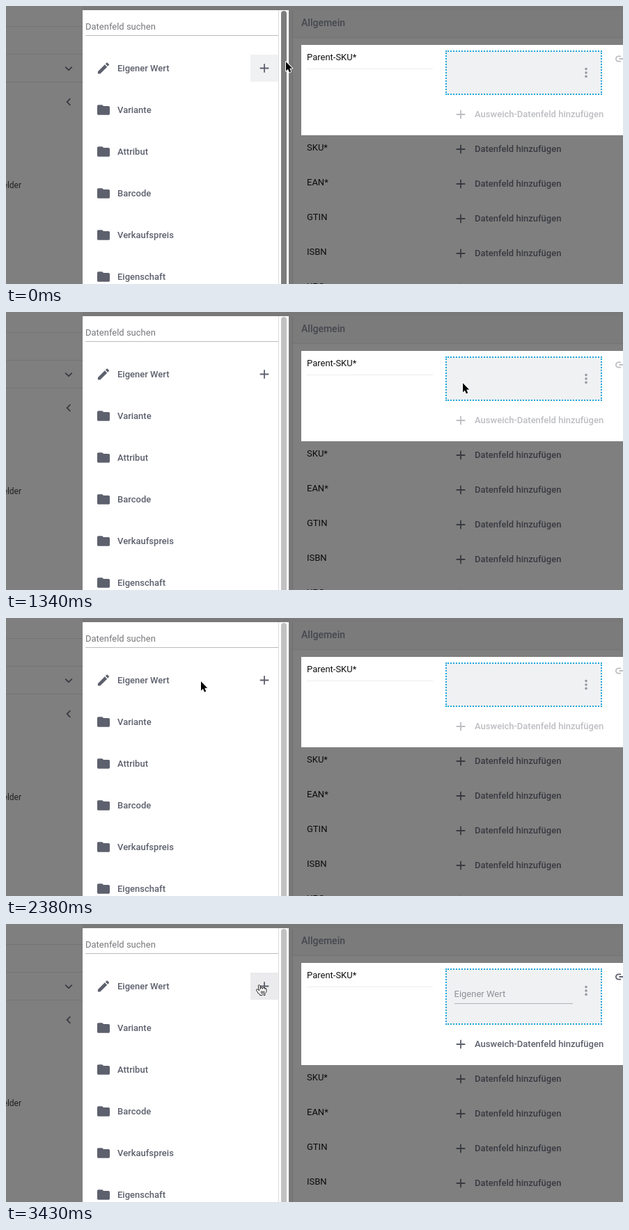
Write an HTML page that moves like this. It is 886 px wide and 400 px high and loops after 8 s.

```html
<!DOCTYPE html>
<html lang="de">
<head>
<meta charset="utf-8">
<title>Datenfelder</title>
<style>
  html, body { margin: 0; width: 100%; height: 100%; overflow: hidden; background: #7f7f7f; }
  svg { display: block; width: 100%; height: 100%; }
  text { font: 400 13px Roboto, sans-serif; }
  .medium { font-weight: 500; }
  .drop { box-sizing: border-box; width: 225px; border: 2px dotted #1ea7d9; background: #f0f1f3; }
</style>
</head>
<body>
<svg id="stage" viewBox="0 0 886 400"></svg>
<script>
const LOOP = 8000;
const INK = '#5d606d', DIM_INK = '#393a41', PALE = '#bdbec2';
const SHIFT = 17; // growth of the field once a value is added

const ICONS = {
  edit: 'M3 17.25V21h3.75L17.81 9.94l-3.75-3.75zM20.71 7.04a1 1 0 0 0 0-1.41l-2.34-2.34a1 1 0 0 0-1.41 0l-1.83 1.83 3.75 3.75z',
  folder: 'M10 4H4c-1.1 0-2 .9-2 2v12c0 1.1.9 2 2 2h16c1.1 0 2-.9 2-2V8c0-1.1-.9-2-2-2h-8z',
  add: 'M19 13h-6v6h-2v-6H5v-2h6V5h2v6h6z',
  down: 'M16.6 8.6 12 13.2 7.4 8.6 6 10l6 6 6-6z',
  left: 'M15.4 7.4 14 6l-6 6 6 6 1.4-1.4L10.8 12z',
  more: 'M10 6a2 2 0 1 0 4 0a2 2 0 1 0-4 0M10 12a2 2 0 1 0 4 0a2 2 0 1 0-4 0M10 18a2 2 0 1 0 4 0a2 2 0 1 0-4 0',
  link: 'M3.9 12c0-1.7 1.4-3.1 3.1-3.1h4V7H7a5 5 0 0 0 0 10h4v-1.9H7c-1.7 0-3.1-1.4-3.1-3.1zM8 13h8v-2H8z'
};

const rect = (x, y, w, h, fill, extra = '') =>
  `<rect x="${x}" y="${y}" width="${w}" height="${h}" fill="${fill}" ${extra}/>`;
const text = (x, y, label, fill, extra = '') =>
  `<text x="${x}" y="${y}" fill="${fill}" ${extra}>${label}</text>`;
const icon = (name, cx, cy, fill, extra = '') =>
  `<path d="${ICONS[name]}" fill="${fill}" transform="translate(${cx} ${cy}) scale(.9) translate(-12 -12)" ${extra}/>`;
const MEDIUM = 'class="medium"';

const sideBackground =
  [29, 69, 109].map(y => rect(0, y, 110, 1, '#747474')).join('') +
  icon('down', 90, 90, DIM_INK) +
  icon('left', 90, 138, DIM_INK) +
  text(22, 262, 'elder', '#202124', 'text-anchor="end" style="font-size:12px"');

const pageBackground =
  rect(110, 0, 776, 6, '#797979') +
  rect(406, 0, 6, 400, '#797979') +
  rect(411, 6, 1, 394, '#6f6f6f') +
  rect(412, 6, 474, 39, '#7b7b7b') +
  rect(412, 45, 474, 1, '#747474') +
  text(424, 29, 'Allgemein', '#45474e', MEDIUM + ' style="font-size:14px"');

const fieldRows = ['SKU*', 'EAN*', 'GTIN', 'ISBN', 'UPC'].map((label, i) => {
  const y = 206 + 50 * i;
  return text(432, y + 2, label, '#0c0c0c') +
    icon('add', 653, y, DIM_INK) +
    text(673, y + 4, 'Datenfeld hinzufügen', DIM_INK, MEDIUM);
}).join('');

const activeField =
  rect(424, 56, 462, 130, '#fff', 'id="card"') +
  text(432, 78, 'Parent-SKU*', '#111') +
  rect(432, 90, 181, 1, '#ededed') +
  `<foreignObject x="631" y="64" width="225" height="90">
     <div xmlns="http://www.w3.org/1999/xhtml" class="drop" id="drop"></div>
   </foreignObject>` +
  icon('more', 833, 96, '#97989f') +
  `<g id="value">${text(643.5, 105, 'Eigener Wert', '#8f9097')}${rect(644, 114, 170, 1, '#b2b3b6')}</g>` +
  icon('link', 884, 76, PALE, 'id="link"') +
  `<g id="fallback">${icon('add', 653, 156, 'currentColor')}
    ${text(673, 160, 'Ausweich-Datenfeld hinzufügen', 'currentColor', MEDIUM)}</g>`;

const menuItems = ['Eigener Wert', 'Variante', 'Attribut', 'Barcode', 'Verkaufspreis', 'Eigenschaft']
  .map((label, i) => {
    const y = 89.5 + 60 * i;
    return icon(i ? 'folder' : 'edit', 140, y, INK) + text(160, y + 4.5, label, INK, MEDIUM);
  }).join('');

const menu =
  rect(110, 6, 296, 394, '#fff') +
  text(114, 34, 'Datenfeld suchen', '#77787c') +
  rect(114, 42, 277, 1, '#bcbcbc') +
  rect(351, 70, 40, 39, '#fff', 'id="button"') +
  '<circle id="ripple" cx="371" cy="89.5" r="20" fill="#e2e2e4"/>' +
  rect(391, 6, 1, 394, '#dcdcdc') +
  rect(395, 7, 8, 420, '#c1c1c1', 'rx="4" id="scrollbar"') +
  menuItems +
  icon('add', 371, 89.5, INK);

const pointers =
  `<path id="arrow" d="M2 1.2V14.4L4.9 11.7 6.9 16.4 9.2 15.4 7.2 10.8H11.2Z" fill="#000"
     stroke="#fff" stroke-width="2" stroke-linejoin="round" paint-order="stroke"/>
   <g id="hand" stroke="#000" stroke-width=".9" stroke-linejoin="round" stroke-linecap="round"><g transform="translate(-7 -7.6)">
     <path fill="#fff" d="M11.3 20.4c-.3-.4-.6-1.1-1.2-2-.3-.5-1.2-1.5-1.5-1.9-.2-.4-.2-.6-.1-1 .1-.6.7-1.1 1.4-1.1.5 0 1 .4 1.4.7l.7.8.6.6c.2.3.3.5 0-.4l-.4-1.8-.6-2.8c-.2-1-.5-2.4 0-2.9.3-.3.9-.4 1.3-.2.5.3.8 1 .9 1.3.2.5.4 1.2.5 2l.5 2.6c0-.4-.1-1.1 0-1.5.1-.3.3-.7.7-.8.3-.1.6-.1.9-.1.3.1.6.3.8.5.4.6.4 1.9.4 1.8.1-.4.1-1.2.3-1.6.1-.2.5-.4.7-.5.3-.1.7-.1 1 0 .2 0 .6.3.7.5.2.3.3 1.3.4 1.7l.3-.7c.4-.6 1.8-.8 1.9.6v1.9c0 .5-.1 1.6-.2 2-.1.3-.4 1-.7 1.4 0 0-1.1 1.2-1.2 1.8-.1.6-.1 1.3 0 1.9 0 0-.8.1-1.2 0-.4-.1-.9-.8-1-1.1-.2-.3-.5-.3-.7 0-.2.4-.7 1.1-1.1 1.1-.7.1-2.1 0-3.1 0 0 0 .2-1-.2-1.4z"/>
     <path fill="none" d="M15.6 17.3v3.4M17.6 17.3v3.4M19.6 17.3v3.4"/>
   </g></g>`;

const stage = document.getElementById('stage');
stage.innerHTML = rect(0, 0, 886, 400, '#7f7f7f') + sideBackground + pageBackground +
  `<g id="rows">${fieldRows}</g>` + activeField + menu + pointers;

// Pointer stops: start time, left, top
const STOPS = [
  [0, 400, 79], [150, 426, 97], [300, 444, 104], [450, 452, 107], [590, 459, 102],
  [740, 467, 95], [890, 480, 94], [1040, 590, 98], [1190, 637, 101], [1340, 654, 101],
  [1490, 576, 115], [1640, 451, 140], [1790, 288, 121], [1930, 276, 111], [2080, 285, 101],
  [2230, 273, 94], [2380, 278, 90], [2530, 335, 87], [2680, 346, 85], [2830, 352, 87],
  [2980, 356, 87], [3280, 357, 87], [3430, 358, 87]
];
const HOVER = 2830, PRESS = 3280, ADDED = 3430;

const el = id => document.getElementById(id);
const show = (id, on) => el(id).setAttribute('display', on ? 'inline' : 'none');
const move = (id, x, y) => el(id).setAttribute('transform', `translate(${x} ${y})`);

function buttonFill(t) {
  if (t < 150) return '#f0f1f2';
  if (t < 300) return '#f9f9fa';
  if (t < HOVER) return '#fff';
  return t < ADDED ? '#f5f5f6' : '#ebebed';
}

function render(t) {
  const [, x, y] = STOPS.findLast(stop => stop[0] <= t);
  const added = t >= ADDED, shift = added ? SHIFT : 0;

  show('arrow', t < HOVER);
  show('hand', t >= HOVER);
  move('arrow', x, y);
  move('hand', x, y);

  el('scrollbar').setAttribute('fill', t < 150 ? '#7c7c7c' : '#c1c1c1');
  el('button').setAttribute('fill', buttonFill(t));
  show('ripple', t >= PRESS && !added);

  move('rows', 0, shift);
  move('fallback', 0, shift);
  el('fallback').setAttribute('color', added ? INK : PALE);
  el('link').setAttribute('fill', added ? INK : PALE);
  el('card').setAttribute('height', 130 + shift);
  el('drop').style.height = 64 + shift + 'px';
  show('value', added);
}

const start = performance.now();
function tick() {
  render((performance.now() - start) % LOOP);
  requestAnimationFrame(tick);
}
tick();
</script>
</body>
</html>
```
